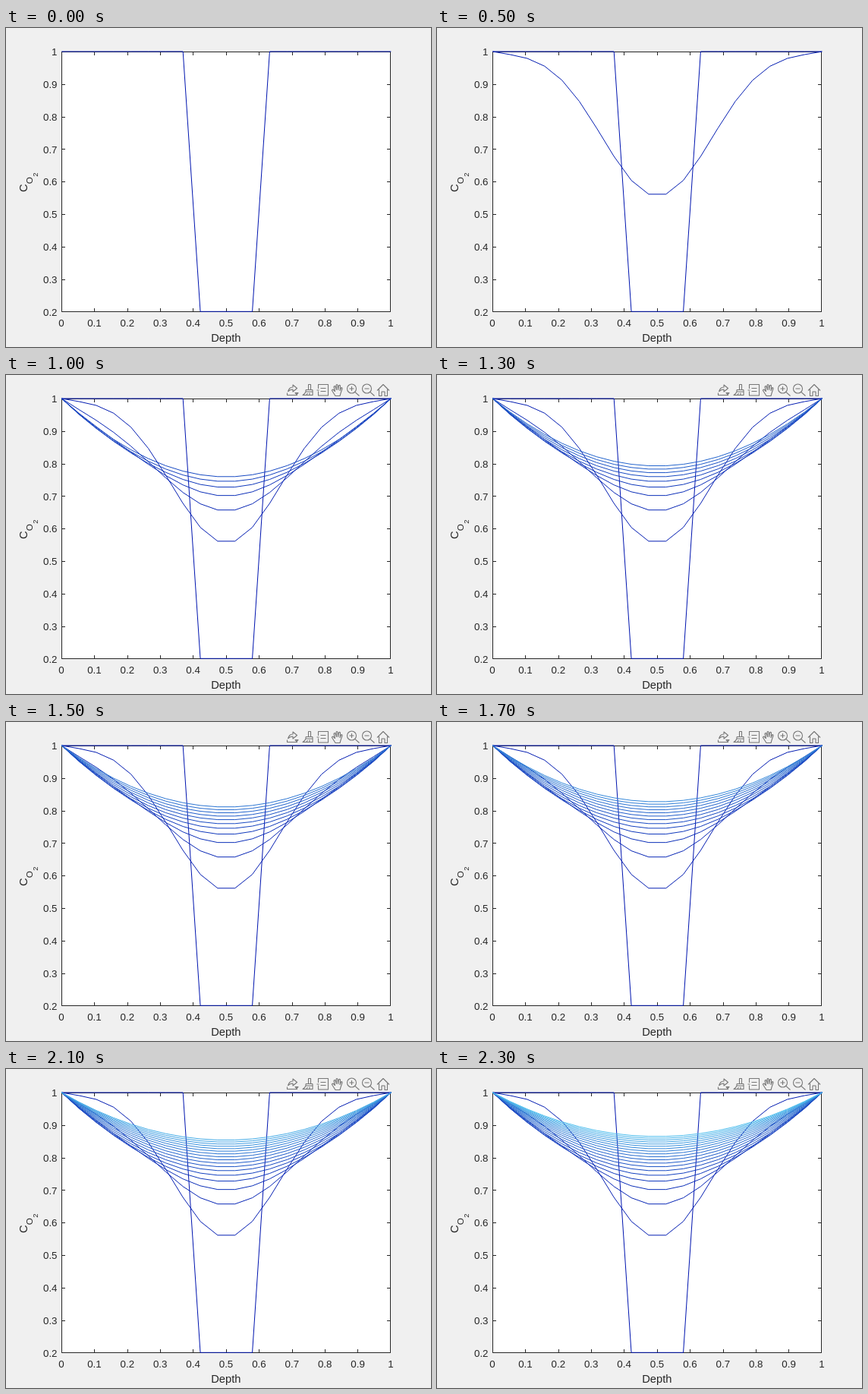
An HTML page with a canvas that plays this animation: 560 px wide and 420 px high, repeating every 2400 ms.

```html
<!DOCTYPE html>
<html lang="en">
<head>
<meta charset="utf-8">
<title>Oxygen concentration over depth</title>
<style>
html, body { margin: 0; width: 100%; height: 100%; overflow: hidden; background: #f0f0f0; }
canvas { display: block; width: 560px; height: 420px; }
</style>
</head>
<body>
<canvas id="stage" width="560" height="420"></canvas>
<script>
const ctx = document.getElementById('stage').getContext('2d');
const LOOP = 2400, HOLD = 500, STEP = 100, TOOLBAR_AT = 900;
const LEFT = 73.5, RIGHT = 506.5, TOP = 31.5, BOTTOM = 373.5;
const INK = '#262626';
const FONT = '"Liberation Sans", Arial, sans-serif';
const CELLS = 19;

// Data coordinates are not snapped to the pixel grid, unlike the frame.
const px = x => 73.3 + x * 434;
const py = c => 31 + (1 - c) / 0.8 * 342.3;

// The dip is a sum of odd sine modes that relaxes into a slowly fading parabola.
const RATE = 0.063, POWER = 2.4, STEADY = 0.055, DEPTH = 0.81;
const modes = [];
for (let m = 1; m < CELLS; m += 2) {
  let start = 0;
  for (let i = 8; i <= 11; i++) start += Math.sin(m * Math.PI * i / CELLS);
  modes.push({ m, start: start * 2 * DEPTH / CELLS, rate: RATE * m ** POWER });
}
const first = modes[0].start;
const bowl = n => STEADY + (first - STEADY) * Math.exp(-RATE * n);

function level(i, n) {
  if (n === 0) return i >= 8 && i <= 11 ? 0.2 : 1;
  return modes.reduce((c, { m, start, rate }) => {
    const size = bowl(n) / m ** 3 + (start - first / m ** 3) * Math.exp(-rate * n);
    return c - size * Math.sin(m * Math.PI * i / CELLS);
  }, 1);
}

function curveColor(n) {
  const from = [0, 20, 175], to = [77, 190, 238];
  return `rgb(${from.map((v, k) => Math.round(v + (to[k] - v) * n / CELLS))})`;
}

const curves = Array.from({ length: 20 }, (_, n) => {
  const path = new Path2D();
  for (let i = 0; i <= CELLS; i++) path.lineTo(px(i / CELLS), py(level(i, n)));
  return { path, color: curveColor(n) };
});

function text(str, x, y, size, align) {
  ctx.font = `${size}px ${FONT}`;
  ctx.textAlign = align;
  ctx.fillText(str, x, y);
}

function line(x1, y1, x2, y2) {
  ctx.beginPath();
  ctx.moveTo(x1, y1);
  ctx.lineTo(x2, y2);
  ctx.stroke();
}

function drawAxes() {
  ctx.fillStyle = '#fff';
  ctx.fillRect(LEFT, TOP, RIGHT - LEFT, BOTTOM - TOP);
  ctx.strokeStyle = ctx.fillStyle = INK;
  ctx.lineWidth = 1;
  ctx.strokeRect(LEFT, TOP, RIGHT - LEFT, BOTTOM - TOP);
  for (let k = 0; k <= 10; k++) {
    const label = String(k / 10);
    const x = Math.min(RIGHT, Math.floor(px(k / 10)) + 0.5);
    line(x, BOTTOM, x, BOTTOM - 4.5);
    line(x, TOP, x, TOP + 4.5);
    text(label, px(k / 10) - 0.3, 393, 13.33, 'center');
    if (k < 2) continue;
    const y = Math.round(py(k / 10)) + 0.5;
    line(LEFT, y, LEFT + 4.5, y);
    line(RIGHT, y, RIGHT - 4.5, y);
    text(label, 67.5, Math.round(py(k / 10) + 5.2), 13.33, 'right');
  }
  text('Depth', 289.8, 413, 14.67, 'center');
  ctx.save();
  ctx.translate(28, 216);
  ctx.rotate(-Math.PI / 2);
  text('C', 0, 0, 14.67, 'left');
  text('O', 10.8, 7, 11.73, 'left');
  text('2', 20.2, 14, 9.4, 'left');
  ctx.restore();
}

const icons = new Path2D([
  // export
  'M370.5 23.5v3h13.5M371.5 22q1.5-6 6.500-6v-3l5.500 4.500-5.500 4.500v-3q-4 0-6.500 3M381 23.500h4l-2 2z',
  // brush
  'M398.5 19v-6.5h3v6.5M395 19.5h9M395 22h9M395 19.5v2.5q-1 3-4 4.5h13v-7M396 26l1.5-2M400 26v-2.5',
  // data tip
  'M411.5 18v-5.5h13v14.5h-13v-5.500M409.500 20h3M414.500 17.500h7M414.500 21.500h7',
  // hand
  'M434 27.5l-4.5-7q0-2 2-1l2 2-1.5-6q1-2 2 0l1.5 4-.5-6q1-2 2 0l.5 6 1-5.5q1.5-1.5 2 .5l-.5 6 1.5-3.5q1.5-1 1.5 1l-2 6-1 3.5z',
  // zoom in and out
  'M461.5 18a6 6 0 1 0-12 0a6 6 0 1 0 12 0M459.8 22.3l5.7 5.2M452.5 18h6M455.5 15v6',
  'M481.5 18a6 6 0 1 0-12 0a6 6 0 1 0 12 0M479.8 22.3l5.7 5.2M472.5 18h6',
  // home
  'M489 20.5l8-8 8 8M491.5 19v8.5h3.5v-5.5h4v5.5h3.5v-8.5'
].join(''));

function drawToolbar() {
  ctx.strokeStyle = '#777';
  ctx.lineWidth = 1.1;
  ctx.stroke(icons);
}

function render(t) {
  ctx.fillStyle = '#f0f0f0';
  ctx.fillRect(0, 0, 560, 420);
  drawAxes();
  const last = t < HOLD ? 0 : Math.min(19, Math.floor((t - HOLD) / STEP) + 1);
  ctx.lineWidth = 1;
  ctx.lineJoin = 'round';
  for (const { path, color } of curves.slice(0, last + 1)) {
    ctx.strokeStyle = color;
    ctx.stroke(path);
  }
  if (t >= TOOLBAR_AT) drawToolbar();
}

const begin = performance.now();
function tick() {
  render((performance.now() - begin) % LOOP);
  requestAnimationFrame(tick);
}
tick();
</script>
</body>
</html>
```
